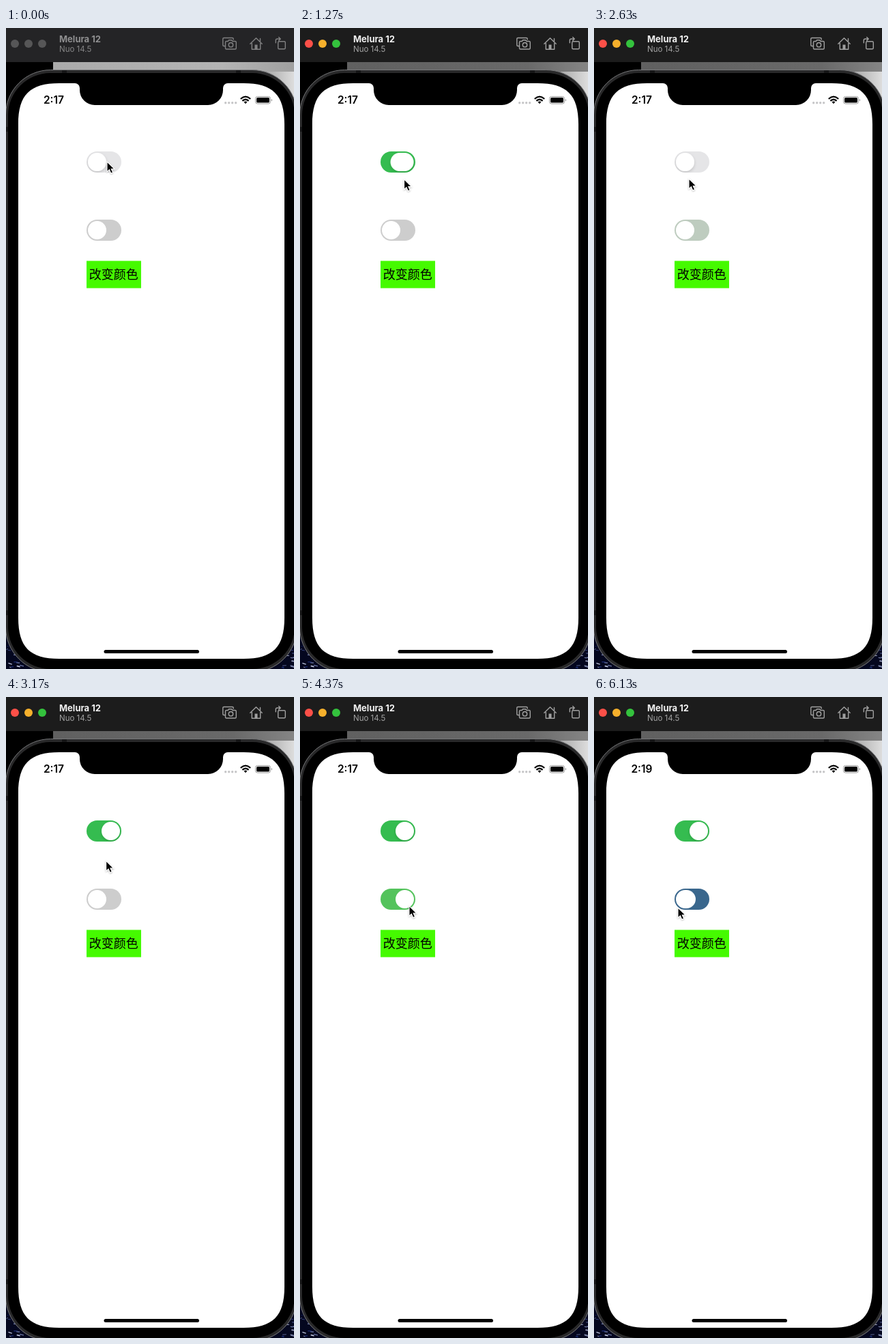
Write an HTML page that moves like this. It is 422 by 940 pixels and loops after 6.16 s.

```html
<!DOCTYPE html>
<html lang="zh">
<head>
<meta charset="utf-8">
<title>Switch demo</title>
<style>
  html, body { margin: 0; width: 100%; height: 100%; overflow: hidden; background: #000; }
  svg { display: block; width: 422px; height: 940px; }
  text { font-family: Inter, "Liberation Sans", sans-serif; }
  .zh { font-family: "Noto Sans CJK SC", "Noto Sans CJK", sans-serif; font-size: 18px; }
  .icon { fill: none; stroke: currentColor; stroke-width: 1.4; stroke-linejoin: round; stroke-linecap: round; }
</style>
</head>
<body>
<svg viewBox="0 0 422 940">
  <defs>
    <linearGradient id="strip">
      <stop offset="0" stop-color="#606060"/><stop offset=".75" stop-color="#696969"/>
      <stop offset="1" stop-color="#858585"/>
    </linearGradient>
    <linearGradient id="pale">
      <stop offset="0" stop-color="#aaa"/><stop offset=".7" stop-color="#b4b4b4"/>
      <stop offset="1" stop-color="#a0a0a0"/>
    </linearGradient>
    <linearGradient id="corner">
      <stop offset="0" stop-color="#777"/><stop offset="1" stop-color="#ddd"/>
    </linearGradient>
    <filter id="soft" x="-50%" y="-50%" width="200%" height="200%">
      <feDropShadow dx="0" dy="2" stdDeviation="2" flood-opacity=".16"/>
    </filter>
    <filter id="drop" x="-50%" y="-50%" width="200%" height="200%">
      <feDropShadow dx="0" dy="1" stdDeviation="1" flood-opacity=".3"/>
    </filter>
    <clipPath id="top"><rect x="118" y="181" width="51" height="31" rx="15.5"/></clipPath>
  </defs>

  <!-- desktop -->
  <rect width="422" height="940"/>
  <rect id="desk" x="69" y="50" width="353" height="14"/>
  <rect x="340" y="64" width="82" height="50" fill="url(#corner)"/>
  <g id="sea"><rect y="880" width="422" height="60" fill="#04071f"/></g>

  <!-- phone -->
  <rect x="-.5" y="61.5" width="427" height="883" rx="66" fill="#29292a" stroke="#77787a"/>
  <path d="M82 62h7v5h-7zM337 62h7v5h-7zM0 145h3v7H0zM0 854h3v7H0z" fill="#161617"/>
  <rect x="3" y="66" width="420" height="874" rx="62"/>
  <path fill="#fff" d="M78 81H101A7 7 0 0 1 108 88V91A22 22 0 0 0 130 113H296A22 22 0 0 0 318 91V88A7 7 0 0 1 325 81H348
    C391 81 408 98 408 141V865C408 908 391 925 348 925H78C35 925 18 908 18 865V141C18 98 35 81 78 81Z"/>
  <rect x="143.5" y="912" width="139.5" height="5" rx="2.5"/>

  <!-- status bar -->
  <text id="clock" x="70" y="111" font-size="15.5" font-weight="600" text-anchor="middle"></text>
  <path d="M321.7 109.7h.01M326.7 109.7h.01M331.7 109.7h.01M336.7 109.7h.01" stroke="#c6c6c8" stroke-width="3.4" stroke-linecap="round"/>
  <g fill="none" stroke="#000" stroke-width="2.3">
    <path d="M343.8 104Q351 97.3 358.2 104M346.4 106.9Q351 102.6 355.6 106.9"/>
    <path d="M348.6 108.6Q351 106.6 353.4 108.6L351 111.2Z" fill="#000" stroke="none"/>
  </g>
  <rect x="365.5" y="100.5" width="22" height="10.6" rx="3" fill="none" stroke="#999"/>
  <rect x="367" y="102" width="19" height="7.6" rx="1.7"/>
  <path d="M388.8 104v3.6q1.3-.5 1.3-1.8t-1.3-1.8" fill="#999"/>

  <!-- switches and button -->
  <g id="switches"></g>
  <rect x="118" y="341.5" width="80" height="40" fill="#45fa00"/>
  <text class="zh" x="157.7" y="367.5" text-anchor="middle">改变颜色</text>

  <!-- title bar -->
  <rect id="bar" width="422" height="50"/>
  <g id="lights"><circle cx="13" cy="23" r="6"/><circle cx="33" cy="23" r="6"/><circle cx="53" cy="23" r="6"/></g>
  <text id="name" x="78" y="21" font-size="13" font-weight="700">Melura 12</text>
  <text id="version" x="78" y="35" font-size="11.5">Nuo 14.5</text>
  <g id="icons" class="icon">
    <path d="M320.5 26.5h-1.2q-1.5 0-1.5-1.5V16q0-1.5 1.5-1.5h12.4q1.5 0 1.5 1.5v1M323 19.5h2.2l1.2-1.7h4.4l1.2 1.7h3.8q1.5 0 1.5 1.5v8.5q0 1.5-1.5 1.5H323q-1.5 0-1.5-1.5V21q0-1.5 1.5-1.5z"/>
    <circle cx="329.5" cy="24.7" r="3.2"/>
    <path d="M357.8 23.2 366.5 14.8 375.2 23.2M360.3 22.5v8.8h12.4v-8.8M372.5 19.5v-4"/>
    <path d="M364.5 31v-6.5h4V31z" fill="currentColor" stroke="none"/>
    <rect x="398.7" y="19.7" width="10.6" height="11" rx="1.5"/>
    <path d="M395.3 21.8V18q0-2 2-2h4.7M399.7 13.6 402.2 16l-2.5 2.4"/>
  </g>
  <path id="cursor" filter="url(#drop)" d="M0 0V14.8L3.4 11.7 5.8 17.1 8.6 15.9 6.3 10.7H10.9Z" stroke="#fff" stroke-width="1.1"/>
</svg>
<script>
const LOOP = 6160, ACTIVE_AT = 330, CLOCK_AT = 5400;
const NS = 'http://www.w3.org/2000/svg';
const $ = id => document.getElementById(id);
const set = (el, attrs) => { for (const k in attrs) el.setAttribute(k, attrs[k]); return el; };
const add = (parent, tag, attrs) => parent.appendChild(set(document.createElementNS(NS, tag), attrs));

const ramp = (t, from, to) => Math.min(1, Math.max(0, (t - from) / (to - from)));
const ease = (t, from, to) => { const u = ramp(t, from, to); return u * u * (3 - 2 * u); };
const lerp = (a, b, u) => a + (b - a) * u;
const mix = (a, b, u) => `color-mix(in srgb, ${b} ${u * 100}%, ${a})`;

// Taps alternate between on and off. The knob stretches while pressed and
// slides across; on the way back the colour fades only after the slide.
function pose(taps, t) {
  const count = taps.filter(start => start <= t).length;
  const on = count % 2 === 1;
  const age = count ? t - taps[count - 1] : Infinity;
  const hold = on ? 160 : 260;
  const width = 27 + 7 * ramp(age, 0, 60) * (1 - ramp(age, hold, hold + 160));
  const slide = ease(age, 100, 290);
  const side = on ? slide : 1 - slide;
  return { width, x: 120 + (47 - width) * side, tint: on ? slide : 1 - ease(age, 340, 520) };
}

const switches = [
  { y: 181, off: '#e5e5e7', on: () => '#35bc50', taps: [450, 1150, 2850], shadow: true },
  { y: 281, off: '#cdcdcd', on: t => t < CLOCK_AT ? '#54c35c' : '#2a5c86',
    taps: [1550, 2150, 3480, 4775, 5410, 5756] }
];
for (const s of switches) {
  s.track = add($('switches'), 'rect', { x: 118, y: s.y, width: 51, height: 31, rx: 15.5 });
  const holder = add($('switches'), 'g', s.shadow ? { 'clip-path': 'url(#top)' } : {});
  s.knob = add(holder, 'rect', { y: s.y + 2, height: 27, rx: 13.5, fill: '#fff' });
  if (s.shadow) s.knob.setAttribute('filter', 'url(#soft)');
}

// Cursor stops: time, x, y.
const STOPS = [[0, 148, 196], [730, 151, 200], [1150, 151, 200], [1550, 158, 300], [2150, 158, 301],
  [2630, 139, 221], [2850, 147, 200], [3670, 146, 319], [4775, 166, 301], [5030, 166, 302],
  [5250, 152, 361], [5410, 128, 306], [6130, 123, 309]];
function cursorAt(t) {
  const i = Math.max(1, STOPS.findIndex(stop => stop[0] > t));
  const [a, b] = t < STOPS.at(-1)[0] ? [STOPS[i - 1], STOPS[i]] : STOPS.slice(-2);
  const u = ease(t, a[0], b[0]);
  return [lerp(a[1], b[1], u), lerp(a[2], b[2], u)];
}

// Glints in the desktop picture around the lower corners.
let seed = 7;
const rnd = () => (seed = seed * 16807 % 2147483647) / 2147483647;
for (let i = 0; i < 60; i++) {
  const x = rnd() * 46 + (i % 2 ? 0 : 376), y = 902 + rnd() * 38;
  add($('sea'), 'path', {
    d: `M${x} ${y}l${2 + rnd() * 4} ${rnd() * 3 - 1}`,
    stroke: mix('#14256e', '#dfe3f2', rnd() ** 2),
    'stroke-width': .7 + rnd()
  });
}

const LIGHTS = ['#fc5048', '#f6b02c', '#34c23d'];
function paintWindow(active) {
  set($('bar'), { fill: active ? '#1c1c1c' : '#242426' });
  set($('desk'), { fill: active ? 'url(#strip)' : 'url(#pale)' });
  set($('name'), { fill: active ? '#f2f2f2' : '#8f8f90' });
  set($('version'), { fill: active ? '#a2a2a2' : '#858586' });
  set($('icons'), { color: active ? '#a0a0a0' : '#818182' });
  [...$('lights').children].forEach((c, i) => set(c, { fill: active ? LIGHTS[i] : '#565657' }));
}

function draw(t) {
  paintWindow(t >= ACTIVE_AT);
  $('clock').textContent = t < CLOCK_AT ? '2:17' : '2:19';
  for (const s of switches) {
    const { x, width, tint } = pose(s.taps, t);
    set(s.knob, { x, width });
    s.track.style.fill = mix(s.off, s.on(t), tint);
  }
  set($('cursor'), { transform: `translate(${cursorAt(t)})` });
}

const began = performance.now();
function tick() {
  draw((performance.now() - began) % LOOP);
  requestAnimationFrame(tick);
}
tick();
</script>
</body>
</html>
```
